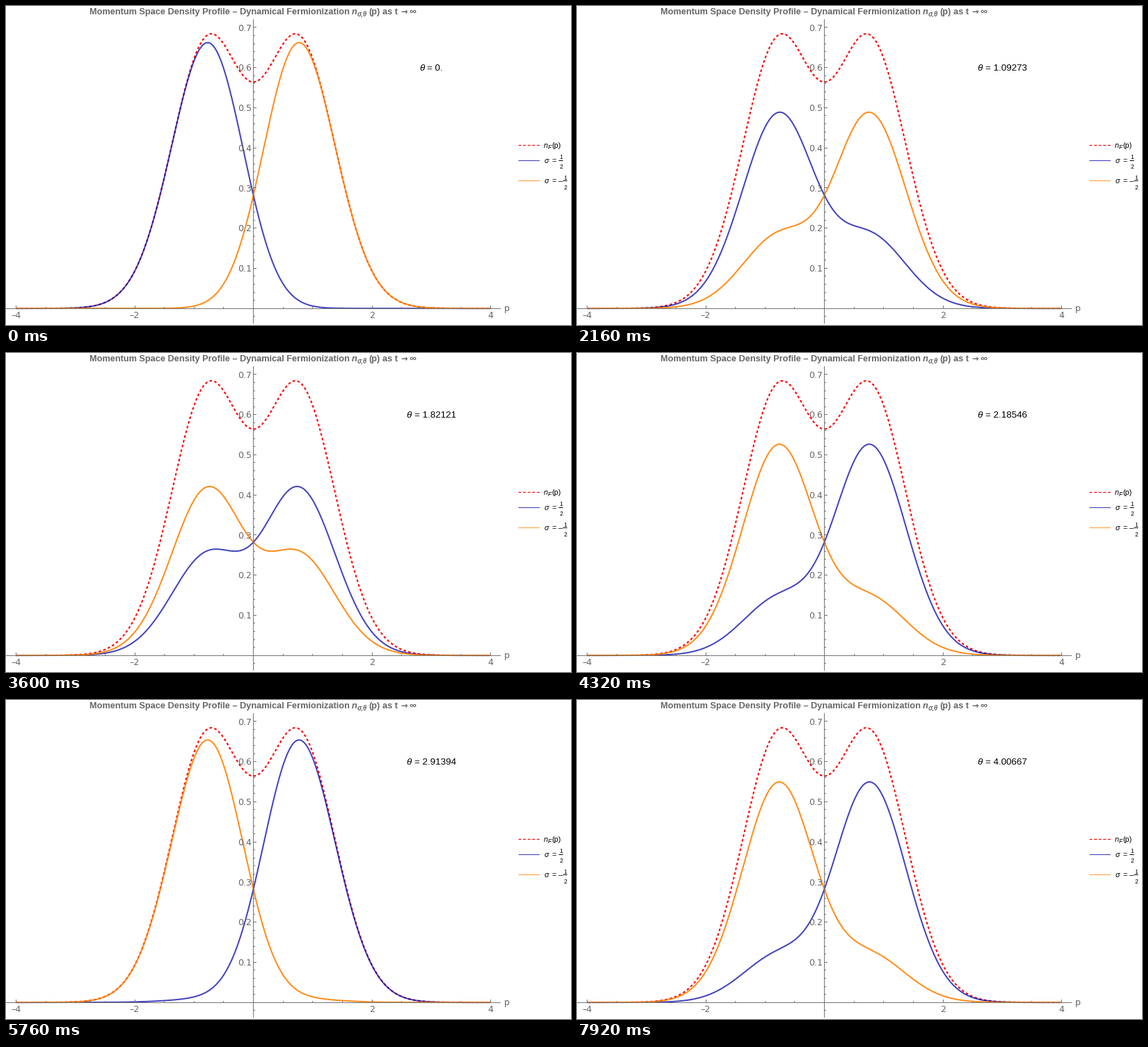
Recreate the animation shown at these times as a matplotlib script. Size 812 by 459 pixels, loop 8 s.

```python
import math

import matplotlib.pyplot as plt
import numpy as np
from matplotlib.animation import FuncAnimation
from matplotlib.collections import LineCollection

WIDTH, HEIGHT, DPI = 812, 459, 64
LOOP_MS, TICK_MS, HOLD_MS = 8000, 20, 180
THETA_STEP = 2 * math.pi / 69
PX = 72 / DPI  # one pixel in points

X0, Y0 = 355.5, 435.1
X_UNIT, Y_UNIT = 85.25, 577.3
GREY = "#666666"
RED = (1, 0, 0)
BLUE = (0, 0, 0.66, 0.74)
ORANGE = (1, 0.5, 0, 0.9)

plt.rcParams["path.snap"] = False
fig = plt.figure(figsize=(WIDTH / DPI, HEIGHT / DPI), dpi=DPI, facecolor="white")
ax = fig.add_axes([0, 0, 1, 1])
ax.set(xlim=(0, WIDTH), ylim=(HEIGHT, 0))
ax.axis("off")


def to_x(p):
    return X0 + X_UNIT * p


def to_y(n):
    return Y0 - Y_UNIT * n


def pixel_centre(v):
    return math.floor(v) + 0.5


def label(x, y, text, size, color="black", font="Liberation Sans", **style):
    """Text with its baseline at pixel (x, y)."""
    return ax.text(x, y, text, fontsize=size * PX, color=color, family=font,
                   va="baseline", zorder=5, **style)


def stroke(x, y, color, width=2.0, dashes=None, zorder=2):
    style = "-" if dashes is None else (0, tuple(d / width for d in dashes))
    line, = ax.plot(x, y, color=color, lw=width * PX, ls=style, zorder=zorder,
                    solid_capstyle="butt", dash_capstyle="butt")
    return line


# Densities of the left and right particle of a fermion pair in a harmonic trap
p = np.linspace(-4, 4, 500)
gauss = np.exp(-p**2)
erfc = np.array([math.erfc(v) for v in p])
total = gauss * (1 + 2 * p**2) / math.sqrt(math.pi)
left = 2 / math.pi * gauss * (
    math.sqrt(math.pi) / 4 * (1 + 2 * p**2) * erfc - p * gauss / 2)
right = total - left


def draw_axes():
    base = pixel_centre(Y0)
    segments = [[(0, base), (711, base)], [(X0, 19), (X0, 457)]]
    for k in range(-8, 9):
        x = pixel_centre(to_x(k / 2))
        segments.append([(x, base), (x, base - (4.5 if k % 4 == 0 else 2.5))])
    for k in range(-1, 36):
        y = pixel_centre(to_y(k / 50))
        segments.append([(X0, y), (X0 + (4.5 if k % 5 == 0 else 2.5), y)])
    ax.add_collection(LineCollection(segments, colors="#737373",
                                     linewidths=PX, zorder=4))
    for k in (-4, -2, 2, 4):
        label(to_x(k), 449, f"{k}".replace("-", "–"), 12.6, GREY,
              "DejaVu Sans", ha="center")
    for k in range(1, 8):
        label(343, to_y(k / 10) + 4.6, f"0.{k}", 12.6, GREY,
              "DejaVu Sans", ha="center")
    label(716, 439, "p", 12.6, GREY, "DejaVu Sans")


def draw_title():
    def bold(x, y, text, size=12.7, **style):
        label(x, y, text, size, GREY, weight="bold", **style)

    bold(120, 12, "Momentum Space Density Profile – Dynamical Fermionization")
    bold(497, 12, "n", style="italic")
    bold(504.5, 15, "σ,θ", 9.5, style="italic")
    bold(521, 12, "(p)")
    bold(541, 12, "as t")
    bold(567.5, 12, "→", 11.5, font="DejaVu Sans")
    bold(579, 12, "∞", 14)


def draw_fraction(x, bar_y):
    label(x, bar_y - 2, "1", 8.5, ha="center")
    label(x, bar_y + 12, "2", 8.5, ha="center")
    stroke([x - 3, x + 3], [bar_y, bar_y], "black", 1)


def draw_legend():
    stroke([736.5, 767], [200.5] * 2, RED, 1.2, (4, 2.6))
    stroke([736.5, 767], [222.5] * 2, BLUE, 1.1)
    stroke([736.5, 767], [251.5] * 2, ORANGE, 0.9)
    label(773, 204, "n", 10.8, style="italic")
    label(778.7, 206, "F", 8.5, style="italic")
    label(784.5, 204, "(p)", 10.8)
    for y, x in ((226, 797.5), (255, 803.5)):
        label(773.5, y, "σ", 10.8, style="italic")
        label(784.5, y, "=", 10.8)
        draw_fraction(x, y - 3.5)
    label(794.3, 255, "–", 10.8)


draw_axes()
draw_title()
draw_legend()

stroke(to_x(p), to_y(total), RED, 2.1, (3.6, 3.4))
blue_line = stroke(to_x(p), to_y(left), BLUE, zorder=2.1)
orange_line = stroke(to_x(p), to_y(right), ORANGE, zorder=2.2)
theta_sign = label(0, 93, "θ", 13.4, style="italic")
theta_value = label(0, 93, "", 13.4)


def update(frame):
    step = frame * TICK_MS // HOLD_MS
    theta = step * THETA_STEP
    weight = math.cos(theta / 2) ** 2
    up = weight * left + (1 - weight) * right
    blue_line.set_ydata(to_y(up))
    orange_line.set_ydata(to_y(total - up))

    value = f"{theta:.6g}" if step else "0."
    digits = len(value) - 1
    text_width = 13.4 * (0.556 * (digits + 1) + 0.278 + 1.14)
    start = 611 - text_width / 2
    theta_sign.set_x(start)
    theta_value.set_x(start + 13.4 * 0.834)
    theta_value.set_text(f"= {value}")
    return blue_line, orange_line, theta_sign, theta_value


animation = FuncAnimation(fig, update, frames=LOOP_MS // TICK_MS,
                          interval=TICK_MS, repeat=True, repeat_delay=0)
plt.show()
```
